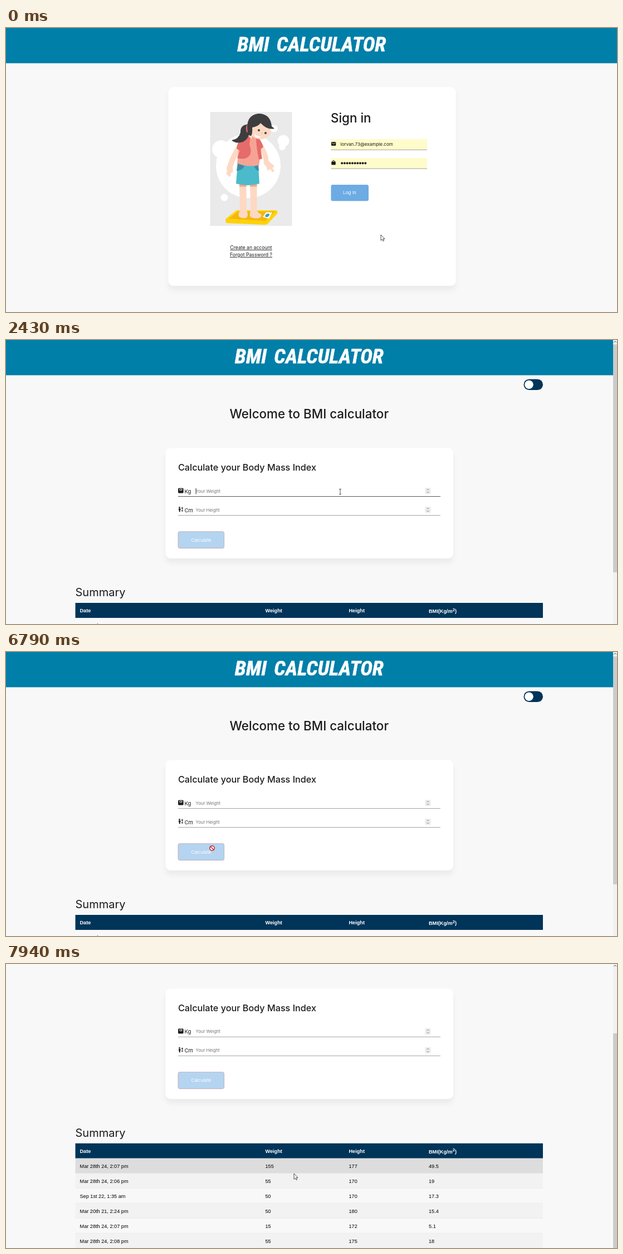
Recreate the animation shown at these times as an HTML page. Size 1097 by 511 pixels, loop 8 s.

```html
<!DOCTYPE html>
<html lang="en">
<head>
<meta charset="utf-8">
<title>BMI calculator</title>
<style>
  html, body { margin: 0; width: 100%; height: 100%; overflow: hidden; background: #f8f8f8; }
  svg { display: block; font-family: Inter, sans-serif; fill: #1b1b1b; }
  .mid { text-anchor: middle; }
  .white { fill: #fff; }
  .navy { fill: #003459; }
  .head { font-size: 22.4px; font-weight: 500; }
  .input { font-size: 7.75px; }
  .hint { fill: #777; }
  .unit { font-size: 9.6px; }
  .link { font-size: 8.7px; text-decoration: underline; }
  .button { font-size: 8.2px; fill: #fff; text-anchor: middle; }
  .card { fill: #fff; filter: drop-shadow(0 8.6px 5px rgba(0, 0, 0, .05)); }
  .table { font: 9.17px "Liberation Sans", Arial, sans-serif; fill: #000; }
  .table .th { font-weight: 700; fill: #fff; }
  .skin { fill: #fdd9c4; }
  .arm { fill: none; stroke: #fdd9c4; stroke-linecap: round; stroke-linejoin: round; }
  .hair { fill: #3d3d3f; }
  .vest { fill: #e66b6b; }
  #title { font: italic 900 condensed 40px "Roboto Condensed", "Open Sans Condensed", Roboto, sans-serif;
    word-spacing: .13em; fill: #fff; stroke: #fff; stroke-width: .6; text-anchor: middle; }
</style>
</head>
<body>
<svg width="1097" height="511" viewBox="0 0 1097 511">
  <defs>
    <g id="spinner">
      <rect x="752.5" y="266" width="10" height="11" fill="#ececec"/>
      <path d="M755.5 270.2l2-2 2 2M755.5 273l2 2 2-2" fill="none" stroke="#777" stroke-width=".9"/>
    </g>
  </defs>

  <g id="page">
    <rect width="1097" height="63.4" fill="#007fa9"/>
    <text id="title">BMI CALCULATOR</text>

    <g id="login">
      <rect class="card" x="291.5" y="106.5" width="516" height="357.5" rx="9"/>
      <rect x="366.5" y="151" width="147" height="205" fill="#eaeaea"/>
      <g class="white">
        <circle cx="435" cy="248" r="58"/><circle cx="386" cy="218" r="16"/>
        <circle cx="498" cy="203" r="10.5"/><circle cx="496" cy="214" r="6"/>
        <circle cx="481" cy="181" r="6.5"/><circle cx="392" cy="305" r="6.5"/>
      </g>
      <path d="M394 344L414 328H485Q488 329 487 334L470 352Q468 354 464 354L396 351Q394 350 394 344Z" fill="#ffd208"/>
      <path d="M400 343L417 330H483L466 347Z" fill="#f3b70e"/>
      <path class="white" d="M461 340L467 331.5 478 332 472 343Z"/>
      <path d="M465 339q1-5 6-5 4 1 1 4-3 4-7 1Z" fill="#3d9fb5"/>
      <path class="skin" d="M419 280H431.5L432 328Q436 337 432 341 426 344 419 340 416 337 420 328ZM438 280H450.5V328Q452 333 458 335 460 340 454 342 444 344 438 339 437 335 439 328Z"/>
      <path d="M419 281h12.5v4.5h-12.5ZM438 281h12.5v4.5h-12.5Z" fill="#eda88c"/>
      <path class="arm" d="M421 210Q412 225 406 238L401 253" stroke-width="10"/>
      <path class="arm" d="M402 249L398 262M403 250L401 265M404 248L405 258" stroke-width="5"/>
      <path class="arm" d="M457 212Q468 230 467 242L473 249" stroke-width="9"/>
      <path class="arm" d="M469 242L479 257M468 243L471 254M469 240L479 249" stroke-width="4.5"/>
      <path d="M424 197Q440 191 454 198L459 214 454 248Q434 251 415 245L418 212Z" fill="#f6a394"/>
      <path class="vest" d="M424 197Q430 193 439 195L437 209Q442 223 437 230 430 238 415 234L420 221 414 217Q416 203 424 197ZM449 195Q457 198 462 214L457 218 460 235 454 237Q449 214 449 195Z"/>
      <path d="M416 244Q434 251 453 247L455 280Q434 286 413 280Z" fill="#4bbaca"/>
      <path d="M416 244L428 248Q425 256 414 257ZM453 247L446 249Q448 256 454 257Z" fill="#3f8ca2"/>
      <path class="hair" d="M438 173Q420 173 421 188 418 200 405 202 413 209 425 205 438 199 437 182Z"/>
      <ellipse class="vest" cx="433.5" cy="181" rx="2.6" ry="7"/>
      <path class="skin" d="M438 178Q445 163 462 165 477 172 475 188 470 201 455 200 447 199 442 194L441 200 436 195Z"/>
      <path class="hair" d="M434 188Q429 157 453 154 475 154 477 177L482 181Q469 184 457 171 453 177 442 179 443 190 440 194 435 194 434 188Z"/>
      <circle class="hair" cx="454" cy="184" r="2"/><circle class="hair" cx="466" cy="189" r="2"/>
      <path class="white" d="M446 190Q450 196 458 195 453 200 447 196Z"/>
      <path d="M459 188l1 3" stroke="#eda88c"/>
      <g class="mid">
        <text class="link" x="440" y="398">Create an account</text>
        <text class="link" x="440" y="411">Forgot Password ?</text>
      </g>
      <text class="head" x="583" y="170">Sign in</text>
      <path d="M583.5 200h172.5v19h-172.5ZM583.5 234h172.5v19h-172.5Z" fill="#fffccb"/>
      <path d="M583.5 219.2h172.5M583.5 253h172.5" stroke="#96968a" stroke-width=".9"/>
      <rect x="584" y="205" width="8.3" height="6.8" rx="1"/>
      <path d="M585 206.5l3.2 2.3 3.2-2.3" fill="none" stroke="#fffccb" stroke-width=".9"/>
      <rect x="584.3" y="240.2" width="7.5" height="6" rx="1"/>
      <path d="M586 240.5v-1q2-2.6 4 0v1" fill="none" stroke="#1b1b1b"/>
      <g id="entered">
        <text x="600.5" y="211.8" font-size="8.1">lorvan.73@example.com</text>
        <path d="M603.2 243.2H646" fill="none" stroke="#1b1b1b" stroke-width="4" stroke-linecap="round" stroke-dasharray="0 4.68"/>
      </g>
      <rect id="loginBox" x="583.5" y="282" rx="3"/>
      <text class="button" x="617" y="299.2">Log In</text>
    </g>

    <g id="calc">
      <rect class="navy" x="929.5" y="70.5" width="34.5" height="19.5" rx="9.75"/>
      <circle class="white" cx="939" cy="80.3" r="7.8"/>
      <text class="head mid" x="544.3" y="141.2">Welcome to BMI calculator</text>
      <rect class="card" id="card" x="286.5" y="194.5" width="516.5" rx="9"/>
      <text x="309" y="235" font-size="16.2" font-weight="500">Calculate your Body Mass Index</text>
      <rect x="309" y="266.5" width="9.6" height="9" rx="1.5"/>
      <path d="M311.2 268.5q2.6-1.6 5.2 0a2.6 2.6 0 0 1-5.2 0M313.8 270.5l1-2" fill="none" stroke="#fff" stroke-width=".8"/>
      <circle cx="311.5" cy="301.3" r="1.3"/>
      <path d="M310 303h3.4v3h-.7v3.2h-2v-3.2h-.7ZM314.6 303l1.8-2.4 1.8 2.4ZM314.6 306.5l1.8 2.4 1.8-2.4ZM316 302h.8v5h-.8Z"/>
      <text class="unit" x="320.5" y="275.6">Kg</text>
      <text class="unit" x="320.5" y="309.6">Cm</text>
      <text class="input" id="weight" x="340.5" y="274.6"/>
      <text class="input" id="height" x="340.5" y="308.6"/>
      <path id="weightLine" d="M309 281.5H780"/>
      <path id="heightLine" d="M309 315.5H780"/>
      <rect id="caret" width=".9" height="11"/>
      <use href="#spinner"/><use href="#spinner" y="34"/>
      <rect id="calcBox" x="309" y="344.7" rx="3"/>
      <text class="button" id="calcText">Calculate</text>
      <g id="summary">
        <text x="124.5" y="461" font-size="20">Summary</text>
        <g class="table" id="table">
          <rect class="navy" x="124.5" y="473" width="839.5" height="27"/>
          <text class="th" y="490.2"><tspan x="132.5">Date</tspan><tspan x="465.5">Weight</tspan><tspan x="615.5">Height</tspan><tspan x="759" dy="1">BMI(Kg/m</tspan><tspan dy="-3.5" font-size="7.6">2</tspan><tspan dy="3.5">)</tspan></text>
        </g>
      </g>
    </g>
  </g>

  <g id="scrollbar">
    <rect x="1090" width="7" height="511" fill="#f1f1f1"/>
    <path d="M1091.5 4.5l2.2-2.5 2.2 2.5" fill="none" stroke="#555"/>
    <rect id="thumb" x="1090" width="7" fill="#cbcbcb"/>
  </g>

  <g id="cursor" stroke="#222" stroke-width=".8">
    <path id="arrow" class="white" d="M0 0V10.3L2.4 8.2 4.1 11.6 5.7 10.8 4.1 7.5H7Z"/>
    <path id="hand" class="white" d="M-1 .6Q0-.4 1 .6V5L5 6Q7 6.5 6.5 9L5.5 13H-.5L-3.5 8.4Q-3.6 6.6-2 7.2L-1 8.4Z"/>
    <g id="blocked" stroke="#c3232b" stroke-width="1.5"><circle class="white" r="4.2"/><path d="M-3-3L3 3"/></g>
    <path id="beam" d="M-2-4.7H2M0-4.7V4.7M-2 4.7H2"/>
  </g>
</svg>
<script>
const $ = id => document.getElementById(id);
const set = (id, attrs) => { for (const k in attrs) $(id).setAttribute(k, attrs[k]); };
const show = (id, on) => { $(id).style.display = on ? '' : 'none'; };
const LOOP = 8000, OPENED = 1490, ENABLED = 4660, SENT = 6790;

// time, x, y, shape
const path = [
  [0, 673, 372, 'arrow'], [510, 673, 372, 'arrow'], [635, 628, 305, 'hand'], [680, 617, 290.5, 'hand'],
  [889, 617, 290.5, 'hand'], [890, 616, 289, 'hand'], [1140, 616, 289, 'blocked'], [OPENED, 616, 289, 'arrow'],
  [1890, 616, 289, 'arrow'], [2080, 607, 281, 'beam'], [2250, 600, 273, 'beam'], [2970, 600, 273, ''],
  [3240, 600, 273, 'beam'], [3400, 575, 282, 'arrow'], [3640, 537, 295, 'beam'], [3780, 515.5, 303, 'beam'],
  [3910, 517, 302, 'beam'], [4060, 510, 302, 'beam'], [ENABLED, 510, 302, ''], [5980, 510, 302, 'beam'],
  [6200, 482, 316, 'arrow'], [6500, 390, 350, 'hand'], [6660, 370, 353, 'hand'], [SENT, 370, 353, 'blocked'],
  [6950, 370, 353, 'blocked'], [7040, 393, 352, 'arrow'], [7540, 605, 338, 'arrow'], [7600, 605, 338, 'arrow'],
  [7940, 517, 377, 'arrow'], [LOOP, 517, 377, 'arrow']
];
const caretOff = [[2830, 2970], [4460, 4660], [5000, 5450], [6280, 6780]];

const rows = `Mar 28th 24, 2:07 pm|155|177|49.5
Mar 28th 24, 2:06 pm|55|170|19
Sep 1st 22, 1:35 am|50|170|17.3
Mar 20th 21, 2:24 pm|50|180|15.4
Mar 28th 24, 2:07 pm|15|172|5.1
Mar 28th 24, 2:08 pm|55|175|18`.split('\n');
$('table').innerHTML += rows.map((row, i) => {
  const y = 500 + 27 * i;
  const cells = row.split('|').map((s, c) => `<tspan x="${[132.5, 465.5, 615.5, 759][c]}">${s}</tspan>`).join('');
  return `<rect id="row${i}" x="124.5" y="${y}" width="839.5" height="27" fill="${i % 2 ? '#f2f2f2' : '#f8f8f8'}"/>
    <path d="M124.5 ${y + 26.7}h839.5" stroke="#ddd" stroke-width=".6"/><text y="${y + 17}">${cells}</text>`;
}).join('');

const titleSize = Math.min(44, 40 * 267 / $('title').getComputedTextLength());
$('title').style.fontSize = titleSize + 'px';
$('title').setAttribute('y', 29 + titleSize * .356);

function pointer(t) {
  const i = path.findLastIndex(k => k[0] <= t);
  const a = path[i], b = path[i + 1] || a;
  const p = b === a ? 0 : (t - a[0]) / (b[0] - a[0]);
  return { x: a[1] + (b[1] - a[1]) * p, y: a[2] + (b[2] - a[2]) * p, shape: a[3] };
}

function input(id, value, hint, focused) {
  $(id).textContent = value || hint;
  $(id).classList.toggle('hint', !value);
  set(id + 'Line', { stroke: focused ? '#555' : '#999', 'stroke-width': focused ? 1 : .9 });
  if (focused) set('caret', {
    x: 340.6 + (value ? $(id).getComputedTextLength() : 0), y: id === 'weight' ? 266.5 : 300.5
  });
}

function draw(t) {
  const cursor = pointer(t), opened = t >= OPENED;
  const active = cursor.shape === 'hand' ? '#4292dc' : '#6dabe4';
  show('login', !opened);
  show('calc', opened);
  show('scrollbar', opened);
  set('title', { x: opened ? 544.3 : 548.8 });

  const filled = t < 1030;
  show('entered', filled);
  set('loginBox', {
    width: filled ? 67.5 : 68.3, height: filled ? 29.3 : 30,
    fill: filled ? active : '#a0c7ec', stroke: filled ? 'none' : '#b795ac', 'stroke-width': .8
  });

  const weight = t < 2970 || t >= SENT ? '' : t < 3040 ? '5' : '55';
  const height = t < ENABLED || t >= SENT ? '' : '175'.slice(0, t < 5450 ? 1 : t < 5780 ? 2 : 3);
  const onWeight = t >= 2330 && t < 3910, onHeight = t >= 3910 && t < SENT;
  input('weight', weight, 'Your Weight', onWeight);
  input('height', height, 'Your Height', onHeight);
  show('caret', (onWeight || onHeight) && !caretOff.some(([a, b]) => t >= a && t < b));

  const ready = height !== '';
  set('card', { height: ready ? 187 : 198.5 });
  set('calcBox', {
    width: ready ? 85.7 : 82.6, height: ready ? 18.6 : 30,
    fill: ready ? active : '#b4d4f1', stroke: ready ? 'none' : '#c4a3a3', 'stroke-width': .8
  });
  set('calcText', { x: ready ? 359 : 350.3, y: ready ? 356.8 : 362.5 });
  set('summary', { transform: `translate(0 ${ready ? -11.5 : 0})` });

  const p = Math.min(1, Math.max(0, (t - 7640) / 300));
  const scroll = 150.3 * p * (2 - p);
  set('page', { transform: `translate(0 ${-scroll})` });
  set('row0', { fill: cursor.y + scroll > 500 ? '#ddd' : '#f8f8f8' });
  set('thumb', { y: 8 + scroll * .777, height: t >= 7000 ? 393 : ready ? 418 : 410 });

  set('cursor', { transform: `translate(${cursor.x} ${cursor.y})` });
  for (const s of ['arrow', 'hand', 'blocked', 'beam']) show(s, s === cursor.shape);
}

const start = performance.now();
(function tick() {
  draw((performance.now() - start) % LOOP);
  requestAnimationFrame(tick);
})();
</script>
</body>
</html>
```
